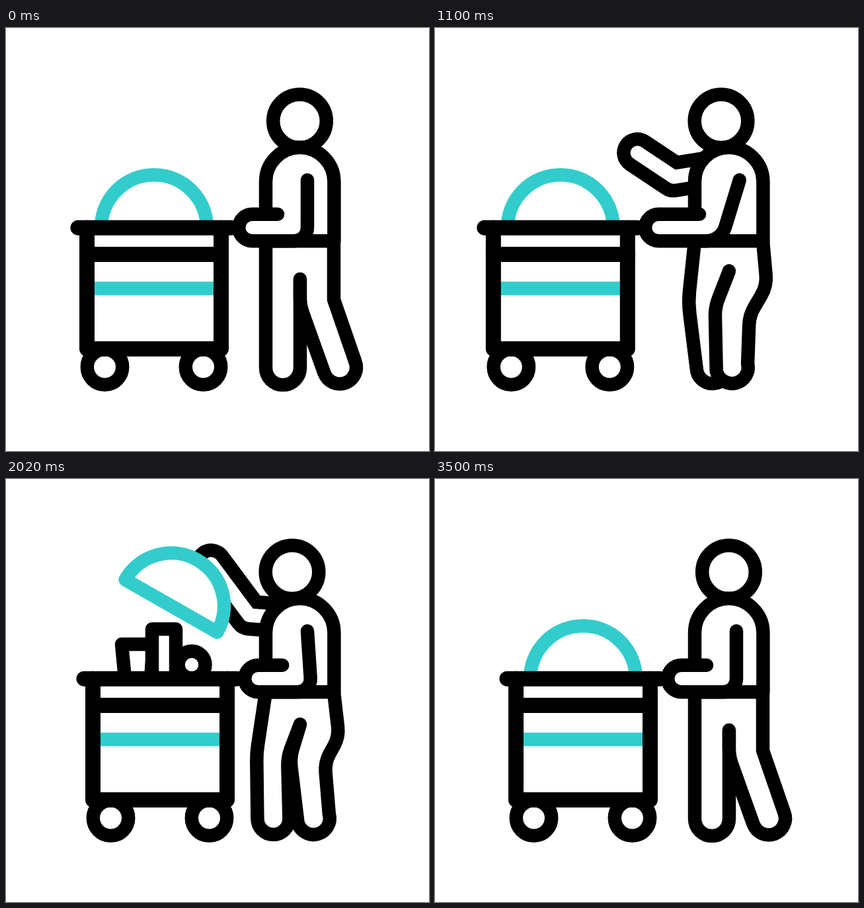
Animation of 640x640 px, one loop 3.6 s. Source, as an HTML page with a canvas:

```html
<!DOCTYPE html>
<html lang="en">
<head>
<meta charset="utf-8">
<title>Food cart</title>
<style>
  html, body { margin: 0; width: 100%; height: 100%; overflow: hidden; background: #fff; }
  canvas { display: block; width: 640px; height: 640px; }
</style>
</head>
<body>
<canvas id="stage" width="640" height="640"></canvas>
<script>
const ctx = document.getElementById('stage').getContext('2d');
const LOOP = 3600, BLACK = '#000', WHITE = '#fff', TEAL = '#33cccc';
const LINE = 20.5, BAR = 23, HIP = 322.3;

const mix = (a, b, k) => a + (b - a) * k;

// Eased 0 to 1 between two times
function rise(t, from, to) {
  const x = Math.min(1, Math.max(0, (t - from) / (to - from)));
  return x * x * (3 - 2 * x);
}

function paint(build, color = BLACK, width = LINE, fill = WHITE) {
  ctx.beginPath();
  build();
  if (fill) {
    ctx.fillStyle = fill;
    ctx.fill();
  }
  ctx.strokeStyle = color;
  ctx.lineWidth = width;
  ctx.stroke();
}

const poly = points => points.forEach(([x, y]) => ctx.lineTo(x, y));
const line = (points, color = BLACK, width = BAR) => paint(() => poly(points), color, width, null);
const ring = (x, y, r) => paint(() => ctx.arc(x, y, r, 0, Math.PI * 2));

function shifted(dx, build) {
  ctx.save();
  ctx.translate(dx, 0);
  build();
  ctx.restore();
}

// Everything that moves, worked out from the time alone
function poseAt(t) {
  const forward = rise(t, 740, 1640), back = rise(t, 1660, 2420);
  const settle = rise(t, 2600, 3320), start = rise(t, 0, 740);
  const cart = -40.5 * rise(t, 0, 550) + 49.5 * rise(t, 940, 1660) - 9 * rise(t, 2375, 3405);
  const lift = rise(t, 1450, 2040) - rise(t, 2460, 2780);
  return {
    cart,
    cross: start - forward + back - settle,
    stride: forward - back,
    head: 444.5 - 11.5 * (start - settle),
    lid: { x: 224 + cart + 17 * lift, y: 302.2 - 110.5 * lift, angle: 0.52 * lift },
    lift,
    raised: rise(t, 0, 560) - rise(t, 2760, 3290),
    reach: rise(t, 740, 1450),
    drop: rise(t, 2600, 2960)
  };
}

// One leg from the hip round the foot to the crotch; side is -1 left, 1 right
function drawLeg(side, hip, bends, foot, inner, crotch) {
  const toe = foot.tilt + (side < 0 ? Math.PI : 0);
  const at = sign => [
    foot.x + sign * foot.r * Math.cos(toe),
    foot.y + sign * foot.r * Math.sin(toe)
  ];
  paint(() => {
    ctx.moveTo(hip, HIP);
    bends.forEach(([x, y, r], i) => {
      const [nx, ny] = bends[i + 1] || at(1);
      ctx.arcTo(x, y, nx, ny, r);
    });
    ctx.lineTo(...at(1));
    ctx.arc(foot.x, foot.y, foot.r, toe, toe + side * Math.PI, side < 0);
    ctx.arcTo(...inner, 445, crotch, 70);
    ctx.lineTo(445, crotch);
  });
}

function drawLegs({ cross, stride }) {
  const crotch = 380 - 19 * cross;
  drawLeg(-1, 393,
    [[393 - 2 * cross - 24 * stride, 415, 150]],
    { x: 419 + 30 * cross - 53 * stride, y: 514, r: 26 - 2 * (cross + stride), tilt: 0.15 * (stride - cross) },
    [445 - 5 * cross - 31 * stride, 420 - 10 * cross + 10 * stride], crotch);
  drawLeg(1, 496,
    [
      [496 + 3 * cross + 12 * stride, 390, 60 * cross + 38 * stride],
      [496 - 33 * cross + 3 * stride, 411 + 36 * cross + 2 * stride, 70 * cross + 34 * stride]
    ],
    { x: 505 - 86 * cross, y: 513.5, r: 25 - cross, tilt: 0.2 * cross - 0.366 },
    [445 - 33 * cross, 420 + 4 * cross], crotch);
}

function drawRearArm({ lid, lift, raised, reach, drop }) {
  const c = Math.cos(lid.angle), s = Math.sin(lid.angle);
  const grip = [lid.x + 21 * c + 85 * s, lid.y + 21 * s - 85 * c];
  const hand = [mix(321, grip[0], reach ** 3), mix(159, grip[1], reach)];
  const elbow = [361 + 7 * lift, 212 + 26 * reach - 32 * lift + 20 * drop];
  const arm = [
    [445, 212],
    [mix(445, elbow[0], raised), mix(250, elbow[1], raised)],
    [mix(445, hand[0], raised), mix(280, hand[1], raised)]
  ];
  line(arm, BLACK, 62);
  line(arm, WHITE, 21);
}

function drawFood() {
  paint(() => poly([[171, 302], [166, 250], [214, 250], [210, 302]]));
  ring(272, 281, 20.5);
  paint(() => poly([[212, 302], [212, 227], [248, 227], [248, 302]]));
}

function drawLid({ x, y, angle }) {
  paint(() => {
    ctx.arc(x, y, 80, Math.PI + angle, angle);
    ctx.closePath();
  }, TEAL);
}

function drawCart() {
  const left = 122.5, right = 325.5, top = 302.2, bottom = 485.5;
  for (const x of [149.5, 298.5]) ring(x, 513, 26.7);
  line([[left, 394], [right, 394]], TEAL, LINE);
  line([[left, 342.5], [right, 342.5]]);
  line([[left, top], [left, bottom], [right, bottom], [right, top]]);
  line([[109, top], [340, top]]);
}

function drawTorso() {
  paint(() => {
    ctx.moveTo(393, HIP);
    ctx.arc(444.7, 232.5, 51.7, Math.PI, 0);
    ctx.lineTo(496.4, HIP);
    ctx.closePath();
  });
}

function drawFrontArm(dx) {
  const pull = Math.max(-dx, 0);
  const shoulder = 456 + pull * 0.14;
  paint(() => {
    ctx.moveTo(411 + dx * (dx < 0 ? 0.32 : 0.8), 281.7);
    ctx.arc(372.5 + dx, 302, 20.3, -Math.PI / 2, Math.PI / 2, true);
    ctx.arcTo(456 + dx * 0.68, HIP, shoulder, 230, 20 + pull * 0.3);
    ctx.lineTo(shoulder, 230);
  });
}

function draw(t) {
  const pose = poseAt(t);
  ctx.fillStyle = WHITE;
  ctx.fillRect(0, 0, 640, 640);
  ctx.lineCap = ctx.lineJoin = 'round';
  drawLegs(pose);
  drawRearArm(pose);
  shifted(pose.cart, drawFood);
  drawLid(pose.lid);
  shifted(pose.cart, drawCart);
  ring(pose.head, 140.8, 40.3);
  drawTorso();
  drawFrontArm(pose.cart);
}

const begin = performance.now();
function tick() {
  draw((performance.now() - begin) % LOOP);
  requestAnimationFrame(tick);
}
tick();
</script>
</body>
</html>
```
